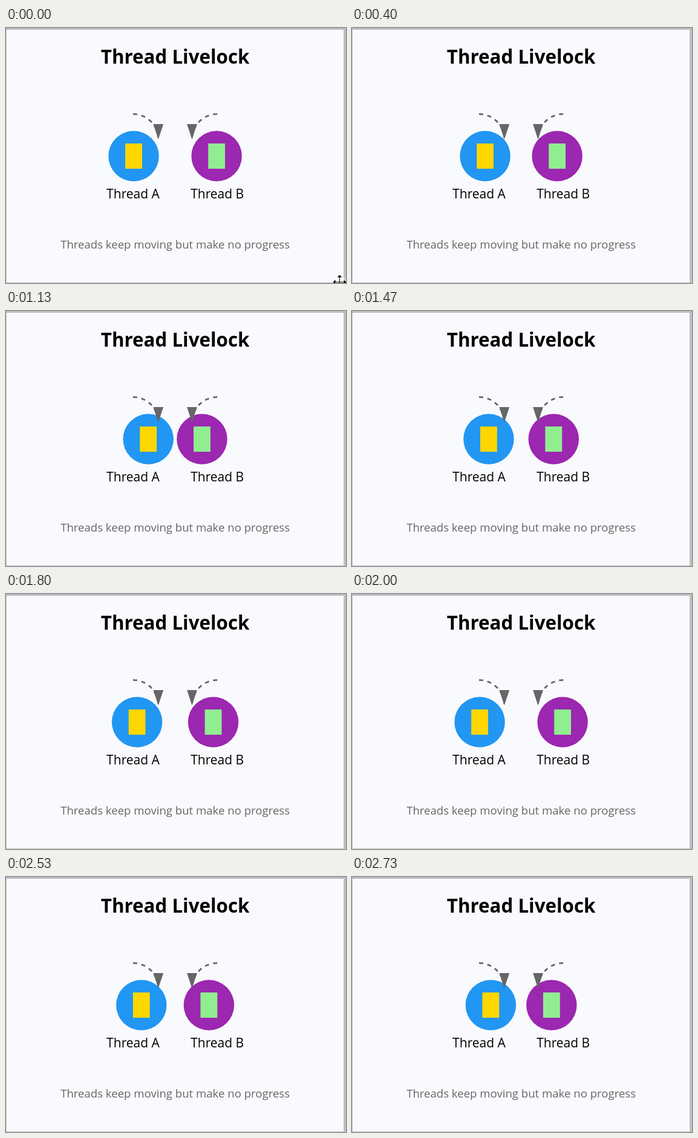
An HTML page that plays this animation: 562 px wide and 422 px high, repeating every 2800 ms.

```html
<!DOCTYPE html>
<html lang="en">
<head>
<meta charset="utf-8">
<title>Thread Livelock</title>
<style>
  html, body { margin: 0; width: 100%; height: 100%; overflow: hidden; background: #bebec5; }
  svg { display: block; width: 562px; height: 422px; }
  text { font-family: "Open Sans", "Noto Sans", sans-serif; text-anchor: middle; }
  .title { font-size: 22.5px; font-weight: 700; }
  .label { font-size: 15.1px; }
  .note { font-size: 13.36px; fill: #666; }
  .arrow { fill: none; stroke: #666; stroke-width: 2; stroke-dasharray: 5 5; }
</style>
</head>
<body>
<svg viewBox="0 0 562 422">
  <defs>
    <marker id="head" markerWidth="10" markerHeight="10" refX="9" refY="3" orient="auto">
      <path d="M0 0V6L9 3Z" fill="#666"/>
    </marker>
  </defs>
  <rect x="1" y="3" width="557" height="418" fill="#f9fafd"/>
  <g transform="translate(1.2 3.2) scale(1.392)">
    <text class="title" x="200" y="40">Thread Livelock</text>
    <g id="threadA">
      <circle r="30" fill="#2196f3"/>
      <rect x="-10" y="-15" width="20" height="30" fill="#ffd700"/>
    </g>
    <g id="threadB">
      <circle r="30" fill="#9c27b0"/>
      <rect x="-10" y="-15" width="20" height="30" fill="#90ee90"/>
    </g>
    <text class="label" x="150" y="200">Thread A</text>
    <text class="label" x="250" y="200">Thread B</text>
    <path class="arrow" d="M150 100A30 30 0 0 1 180 130" marker-end="url(#head)"/>
    <path class="arrow" d="M250 100A30 30 0 0 0 220 130" marker-end="url(#head)"/>
    <text class="note" x="200" y="260">Threads keep moving but make no progress</text>
  </g>
  <path id="cursor" transform="translate(551.5 420.5)" stroke="#fff" stroke-width="2" paint-order="stroke"
    d="M0 -12L4 -8H.5V-.5H7V-4L11 0L7 4V.5H.5V8H4L0 12L-4 8H-.5V.5H-7V4L-11 0L-7 -4V-.5H-.5V-8H-4Z"/>
</svg>
<script>
  const LOOP = 2800, STEP = 200 / 3, PERIOD = 2000, LAG = 38, TRAVEL = 20;
  const [threadA, threadB, cursor] =
    ["threadA", "threadB", "cursor"].map(id => document.getElementById(id));

  // Step starts are rounded to whole hundredths of a second.
  const stepStart = n => Math.round(n * STEP / 10) * 10;

  function stepAt(time) {
    const n = Math.round(time / STEP);
    return stepStart(n) > time ? n - 1 : n;
  }

  function draw(time) {
    const step = stepAt(time % LOOP);
    const phase = (step * STEP - LAG + PERIOD) % PERIOD / PERIOD;
    const shift = TRAVEL * (1 - Math.abs(1 - 2 * phase));
    threadA.setAttribute("transform", `translate(${150 + shift} 150)`);
    threadB.setAttribute("transform", `translate(${250 - shift} 150)`);
    cursor.style.display = step === 0 ? "" : "none";
  }

  let start;
  function tick(now) {
    start ??= now;
    draw(now - start);
    requestAnimationFrame(tick);
  }
  draw(0);
  requestAnimationFrame(tick);
</script>
</body>
</html>
```
